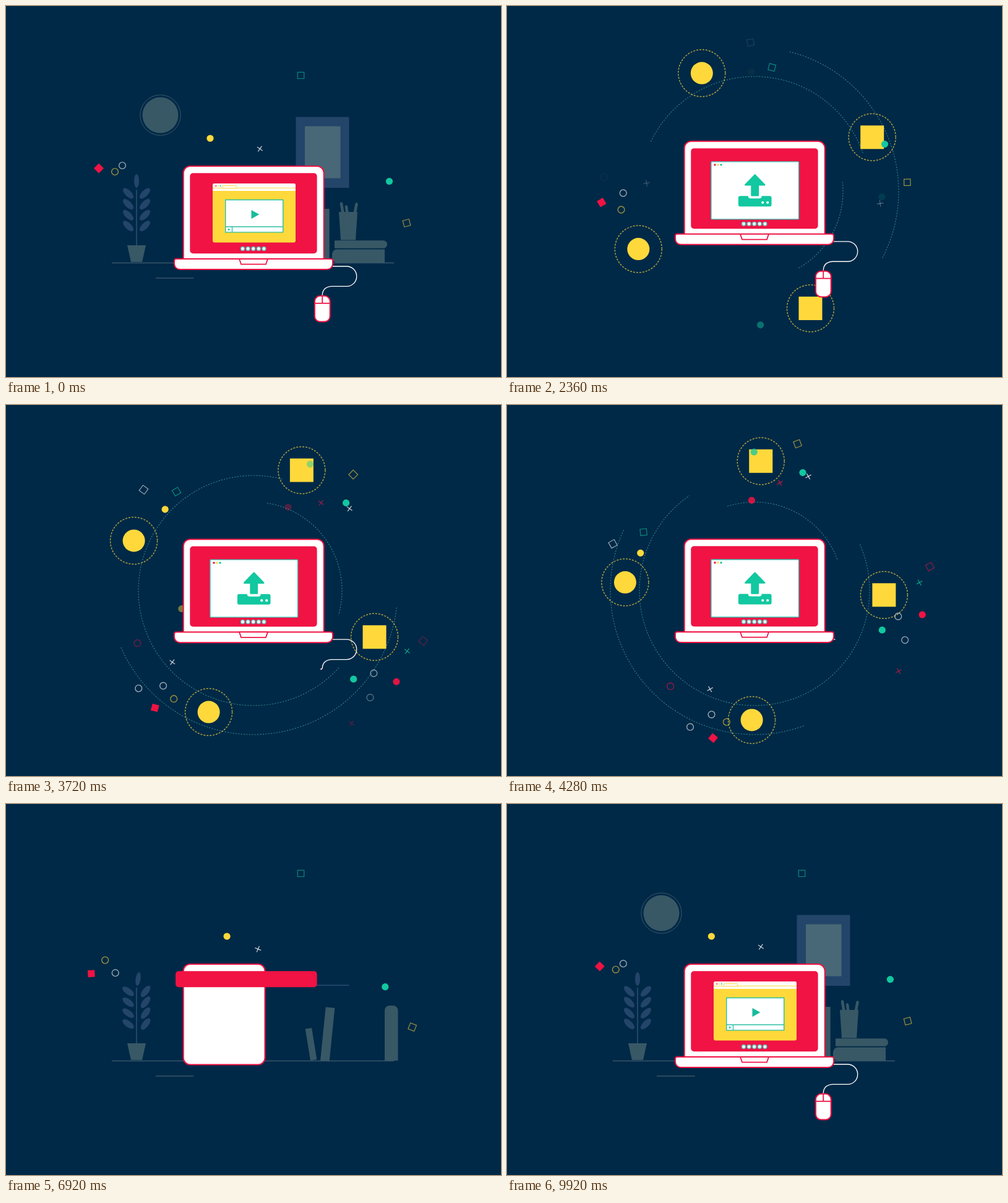
An HTML page with a canvas for the animation above (9.96 s loop, 800 by 600 pixels).

```html
<!DOCTYPE html>
<html lang="en">
<head>
<meta charset="utf-8">
<title>Share from the desk</title>
<style>
html, body { margin: 0; width: 100%; height: 100%; overflow: hidden; background: #002947; }
canvas { display: block; width: 100vw; height: 100vh; }
</style>
</head>
<body>
<canvas id="stage" width="800" height="600"></canvas>
<script>
const ctx = document.getElementById('stage').getContext('2d');
const LOOP = 9.96, INTRO = 6;
const BG = '#002947', RED = '#f01344', YELLOW = '#ffd93b', TEAL = '#12c8a0', WHITE = '#fff';
const SLATE = '#385866', BLUE = '#24456a', PANE = '#486877', RULE = '#37546a';
const CX = 400, CY = 300, RAD = Math.PI / 180;

// Timing helpers; s counts seconds from the start of the build-up.
const clamp = (v, a = 0, b = 1) => Math.min(b, Math.max(a, v));
const part = (s, a, b) => clamp((s - a) / (b - a));
const lerp = (a, b, k) => a + (b - a) * k;
const smooth = x => x < .5 ? 2 * x * x : 1 - 2 * (1 - x) ** 2;
const back = x => x <= 0 ? 0 : 1 + 2.7 * (x - 1) ** 3 + 1.7 * (x - 1) ** 2;
const ease = (s, a, b) => smooth(part(s, a, b));
const show = (s, a, b, c, d) => ease(s, a, b) - ease(s, c, d);
const pop = (s, a, b, c, d) => back(part(s, a, b)) * (1 - ease(s, c, d));

// Drawing helpers.
function at(x, y, sx, sy, rot, draw) {
  if (Math.abs(sx) < .003 || Math.abs(sy) < .003) return;
  ctx.save();
  ctx.translate(x, y);
  ctx.rotate(rot);
  ctx.scale(sx, sy);
  draw();
  ctx.restore();
}
function paint(fill, stroke, width = 1) {
  if (fill) { ctx.fillStyle = fill; ctx.fill(); }
  if (stroke) { ctx.strokeStyle = stroke; ctx.lineWidth = width; ctx.stroke(); }
}
function box(x, y, w, h, r, fill, stroke, width) {
  ctx.beginPath();
  ctx.roundRect(x, y, w, h, r);
  paint(fill, stroke, width);
}
function disc(x, y, r, fill, stroke, width) {
  ctx.beginPath();
  ctx.arc(x, y, Math.max(0, r), 0, 7);
  paint(fill, stroke, width);
}
function poly(points, fill, stroke, width, open) {
  ctx.beginPath();
  points.forEach(p => ctx.lineTo(p[0], p[1]));
  if (!open) ctx.closePath();
  paint(fill, stroke, width);
}
const line = (x1, y1, x2, y2, color, width) =>
  poly([[x1, y1], [x2, y2]], null, color, width, true);
const taper = (top, bottom, y1, y2, ...style) =>
  poly([[-top, y1], [top, y1], [bottom, y2], [-bottom, y2]], ...style);
const lights = (x, y, gap, r) =>
  [RED, YELLOW, TEAL].forEach((c, i) => disc(x + i * gap, y, r, c));

// Room behind the laptop.
function plant(s) {
  const k = show(s, .15, .7, 4.4, 4.9);
  const sway = .14 * Math.cos(6 * (s - .92)) * (1 - part(s, .92, 2));
  const leaf = (x, y, rx, ry, rot) => {
    ctx.beginPath();
    ctx.ellipse(x, y, rx, ry, rot, 0, 7);
    paint(BLUE);
  };
  at(211, 415, k, k, 0, () => {
    taper(15, 9, -28, -1, SLATE);
    line(0, -118, 0, -28, BLUE, 2);
    leaf(sway * 18, -132, 4, 11, sway);
    for (let y = -112; y < -50; y += 17.6) {
      leaf(-13.5, y, 11, 5, .78 - sway);
      leaf(13.5 + sway * 8, y, 11, 5, -.78 - sway);
    }
  });
}
function wall(s) {
  const clock = pop(s, 1.2, 1.7, 4.3, 4.8);
  at(249.5, 176.5, clock, clock, 0, () => {
    disc(0, 0, 29, SLATE);
    disc(0, 0, 32.7, null, SLATE, 1);
  });
  const w = show(s, .5, .85, 4.8, 5.1);
  const h = Math.max(.015, show(s, .95, 1.45, 4.4, 4.85));
  at(511.5, 294, w, h, 0, () => {
    box(-43, -114.5, 86, 114.5, 0, BLUE);
    if (h > .05) box(-28.5, -99.5, 57.5, 84, 0, PANE);
  });
}
function shelf(s) {
  const up = show(s, .45, .85, 4.5, 4.95), lean = 1 - ease(s, 1, 1.4);
  at(492, 415, 1, up, -.16 * lean, () => box(0, -52, 10.5, 52, 1, SLATE));
  at(508, 415, 1, up, .1 * lean, () => box(0, -87, 14.7, 87, 1, SLATE));
  const fall = part(s, 1.1, 1.55) ** 2, tall = 89 - 4 * fall;
  at(612, 415, 1, up, -Math.PI / 2 * fall, () =>
    box(0, -tall, 21.5, tall, [8, 8, 0, 0], SLATE));
  const slide = show(s, 1.55, 2.15, 4.4, 4.8);
  ctx.globalAlpha = slide;
  box(531 + 60 * (1 - slide), 379.3, 85, 12.4, [1, 6, 6, 1], SLATE);
  ctx.globalAlpha = 1;
  const cup = show(s, 1.6, 2.2, 4.3, 4.7);
  at(553, 378.5, cup, cup, -.3 * (1 - cup), () => {
    taper(15, 12, -45.5, 0, SLATE);
    ctx.lineCap = 'round';
    line(-11, -59, -8, -40, SLATE, 4.5);
    line(-3, -54, -1, -40, SLATE, 4.5);
    line(13.5, -58, 10, -40, SLATE, 4.5);
  });
}
function floor(s) {
  const half = 228 * show(s, 0, .55, 4.7, 5.2);
  if (half > 2) line(399 - half, 415.5, 399 + half, 415.5, RULE, 1.5);
  const from = 242 + 61.5 * ease(s, 5.28, 5.7), to = 242 + 61.5 * ease(s, .1, .55);
  if (to - from > .5) line(from, 440, to, 440, RULE, 1.3);
}

// Laptop, its windows and the mouse.
function browser(s) {
  const k = pop(s, 2.3, 2.8, 4.2, 4.65), edge = '#2abfa4';
  at(401, 335, k, k, 0, () => {
    box(-67, -48, 134, 95.5, 3, YELLOW);
    box(-67, -48, 134, 12, [3, 3, 0, 0], WHITE);
    line(-67, -40.7, 67, -40.7, YELLOW, 1);
    at(-39.5, 0, 1, 1, 0, () => taper(10.5, 12, -44.3, -40.2, WHITE, YELLOW, 1));
    lights(-61.7, -44, 3.7, 1.1);
    const v = back(part(s, 2.55, 3));
    at(0, 4.7, v, v, 0, () => {
      box(-46.3, -26.2, 93, 52.4, 0, WHITE, edge, 1.4);
      line(-46.3, 17.3, 46.7, 17.3, edge, 1.3);
      line(-35.5, 17.3, -35.5, 26, edge, 1.3);
      poly([[-42, 19.7], [-38.5, 21.7], [-42, 23.7]], TEAL);
      poly([[-4.5, -9.8], [8.3, -2.7], [-4.5, 4.6]], '#18bb9d');
    });
  });
}
function upload(s) {
  const k = pop(s, 4.65, 5.1, 8.9, 9.3);
  at(400.7, 338.5, k, k, 0, () => {
    box(-70.7, -46.5, 141.5, 93, 1, WHITE, '#3cc4b4', 1.4);
    lights(-64.7, -41.5, 5, 1.7);
    const icon = pop(s, 4.95, 5.4, 8.8, 9.2);
    at(0, 0, icon, icon, 0, () => {
      box(-26.8, 9, 53.6, 17, 3, TEAL);
      box(-11, 4, 22, 9, 4, WHITE);
      ctx.lineJoin = 'round';
      poly([[0, -25], [15.5, -9], [-15.5, -9]], TEAL, TEAL, 2.5);
      box(-6.4, -10, 12.8, 19.2, 1, TEAL);
      disc(12.5, 19.5, 2.1, WHITE);
      disc(20.5, 19.5, 2.1, WHITE);
    });
  });
}
function mouse(s) {
  const cable = show(s, 1.4, 1.95, 7.7, 8.3);
  if (cable > .002) {
    ctx.setLineDash([125 * cable, 999]);
    ctx.beginPath();
    ctx.moveTo(528, 421);
    ctx.lineTo(550.5, 421);
    ctx.arc(550.5, 437.2, 16.2, -Math.PI / 2, Math.PI / 2);
    ctx.lineTo(527, 453.4);
    ctx.quadraticCurveTo(511.5, 454, 511.2, 468);
    paint(null, WHITE, 1.3);
    ctx.setLineDash([]);
  }
  const k = show(s, 1.85, 2.25, 7.4, 7.75);
  at(511.2, 468, k, k, 1.2 * (1 - k), () => {
    box(-12.3, .8, 24.8, 41.8, 9, WHITE, RED, 2);
    line(-12, 12.8, 12, 12.8, RED, 1.8);
    line(0, 1, 0, 12.8, RED, 1.8);
  });
}
function laptop(s) {
  const lid = show(s, .65, 1.15, 9.45, 9.88);
  if (lid > .01) box(286.7, 259, 227 * lid, 162.5, Math.min(11, 113 * lid), WHITE, RED, 2);
  const screen = show(s, .76, 1.27, 9.25, 9.65), slide = 29 * (1 - screen);
  if (screen > .01)
    box(297.3 - slide, 270.3, 205.3 + slide, 130 * screen, Math.min(5, 65 * screen), RED);
  const base = show(s, 1.1, 1.5, 9.15, 9.5);
  at(400, 409, base, 1, 0, () => {
    box(-128, 0, 256, 17, [3, 3, 9, 9], WHITE, RED, 2);
    taper(23, 20, 0, 8.7, WHITE, RED, 1.8);
  });
  for (let i = 0; i < 5; i++) {
    const start = 1.96 - i * .04;
    const r = 3 * pop(s, start, start + .35, 9, 9.25);
    if (r > .1) disc(382.5 + i * 8.6, 392.5, r, WHITE, '#63c3bd', 1.4);
  }
  browser(s);
  upload(s);
}

// Small marks: they drift around the desk, then swing round the laptop.
const MEET = 5.48, AIM = 7.12;
const turn = s => -18.4 * Math.max(0, s - MEET) ** 1.5;
const ALPHA = { dot: 1, block: 1, ring: .6, square: .6, cross: .75 };

function mark(kind, color, radius, angle, rot, alpha) {
  ctx.globalAlpha = alpha * ALPHA[kind];
  at(CX + radius * Math.cos(angle * RAD), CY + radius * Math.sin(angle * RAD), 1, 1, rot * RAD, () => {
    if (kind === 'dot') disc(0, 0, 5.6, color);
    if (kind === 'ring') disc(0, 0, 5.4, null, color, 1.4);
    if (kind === 'block') box(-5.6, -5.6, 11.2, 11.2, 0, color);
    if (kind === 'square') box(-5.2, -5.2, 10.4, 10.4, 0, null, color, 1.2);
    if (kind === 'cross') {
      line(-5.3, 0, 5.3, 0, color, 1.3);
      line(0, -5.3, 0, 5.3, color, 1.3);
    }
  });
  ctx.globalAlpha = 1;
}

// Home place and speed in pixels per second; marks roll as they drift sideways.
const drifters = [
  { kind: 'block', color: RED, x: 150, y: 262.5, vx: 4, vy: -3.9, rot: 45 },
  { kind: 'ring', color: YELLOW, x: 176, y: 268, vx: 5.2, vy: 5.1 },
  { kind: 'ring', color: WHITE, x: 188, y: 258, vx: 3.7, vy: -5 },
  { kind: 'dot', color: YELLOW, x: 330, y: 214, vx: -8.9, vy: 0 },
  { kind: 'cross', color: WHITE, x: 410.3, y: 231, vx: 1, vy: -1.2, rot: 35 },
  { kind: 'square', color: TEAL, x: 476.5, y: 112.3, vx: 0, vy: 0 },
  { kind: 'dot', color: TEAL, x: 619.5, y: 283.5, vx: 2.2, vy: -4 },
  { kind: 'square', color: YELLOW, x: 647.5, y: 351, vx: -3, vy: -3.2, rot: -15 }
];
function drawDrifters(s) {
  const shown = part(s, 0, .15) * (1 - ease(s, 9.2, 9.8));
  const dim = 1 - .55 * show(s, 6.3, 7, 7.6, 8.8);
  const t = Math.min(s, MEET) - 3.96;
  for (const { kind, color, x, y, vx, vy, rot = 0 } of drifters) {
    const dx = x + vx * t - CX, dy = y + vy * t - CY;
    mark(kind, color, Math.hypot(dx, dy), Math.atan2(dy, dx) / RAD + turn(s),
      rot + 4 * vx * Math.min(t, 0) - turn(s), shown * (kind === 'dot' ? dim : 1));
  }
}

// Kind, colour, orbit radius and angle, in order of appearance.
const orbiters = [
  ['dot', TEAL, 216, 63], ['cross', WHITE, 204, -19], ['cross', WHITE, 175, 160],
  ['square', WHITE, 241, -116], ['dot', TEAL, 206, -22], ['ring', WHITE, 244, 161],
  ['dot', YELLOW, 194, -116], ['cross', TEAL, 267, 43], ['dot', RED, 274, 54],
  ['ring', WHITE, 236, 56], ['cross', RED, 179, -31], ['ring', RED, 206, 177],
  ['square', RED, 286, 38], ['ring', WHITE, 256, 64], ['cross', RED, 267, 75],
  ['dot', RED, 146, -46]
];
function drawOrbiters(s) {
  const swing = turn(s) - turn(AIM);
  orbiters.forEach(([kind, color, radius, angle], i) => {
    const birth = 5.5 + i * .1;
    mark(kind, color, radius, angle + swing, 15 - swing, show(s, birth, birth + 1.7, 9, 9.7));
  });
}

// Each dashed arc grows, sweeps round and closes up again.
const arcs = [
  { r: 233, mid: 33, speed: 80.6, span: 145, last: 2.6 },
  { r: 186, mid: -146, speed: -83.3, span: 210, last: 4.56 },
  { r: 143, mid: -5, speed: -45.6, span: 94, last: 2.6 }
];
function drawArcs(s) {
  const t = s - AIM, born = 1.76;
  ctx.setLineDash([2.2, 2.2]);
  ctx.globalAlpha = 1 - ease(s, 9, 9.6);
  for (const { r, mid, speed, span, last } of arcs) {
    if (t < -born || t > last) continue;
    const centre = mid + speed * (t + .14 * t * t);
    const half = span * (t + born) * (last - t) / (born * last) / 2;
    ctx.beginPath();
    ctx.arc(CX, CY, r, (centre - half) * RAD, (centre + half) * RAD);
    paint(null, 'rgba(85,190,178,.58)', 1.1);
  }
  ctx.globalAlpha = 1;
  ctx.setLineDash([]);
}

function drawBadges(s) {
  const t = s - AIM, swing = -32.16 * t - 1.07 * t * t;
  for (let i = 0; i < 4; i++) {
    const start = 5.44 + i * .07, end = 8.95 + i * .08;
    const k = pop(s, start, start + .5, end, end + .4);
    const a = (-139 + 89.2 * i + swing) * RAD;
    at(CX + 209.5 * Math.cos(a), CY + 209.5 * Math.sin(a), k, k, 0, () => {
      ctx.setLineDash([3, 2]);
      disc(0, 0, 38, null, 'rgba(255,217,59,.68)', 1.5);
      ctx.setLineDash([]);
      if (i % 3 === 0) disc(0, 0, 18, YELLOW);
      else box(-19, -19, 38, 38, 0, YELLOW);
    });
  }
}

function render(time) {
  const s = (time + LOOP - INTRO) % LOOP;
  ctx.fillStyle = BG;
  ctx.fillRect(0, 0, 800, 600);
  [wall, floor, plant, shelf, drawArcs, drawBadges, drawDrifters, drawOrbiters].forEach(draw => draw(s));
  const lift = 38 * ease(s, 4.6, 5.4) + 4 * (1 - (1 - part(s, 5.4, 8.24)) ** 2);
  at(0, -lift, 1, 1, 0, () => {
    mouse(s);
    laptop(s);
  });
}

const began = performance.now();
function frame() {
  render((performance.now() - began) / 1000 % LOOP);
  requestAnimationFrame(frame);
}
frame();
</script>
</body>
</html>
```
